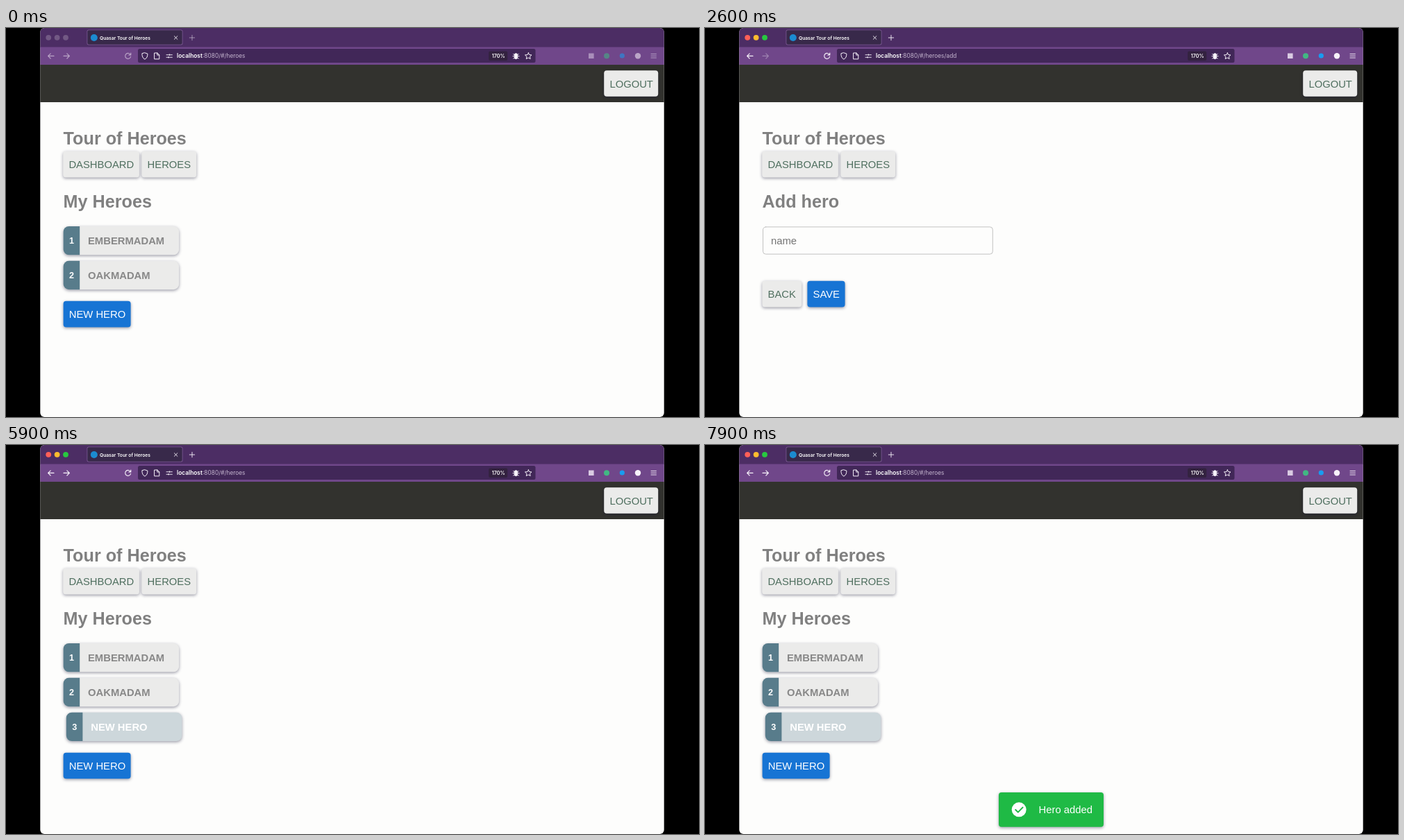
Animation, 998 px wide and 561 px high, one loop 8 s. Source, as an HTML page with a canvas:

```html
<!DOCTYPE html>
<html lang="en">
<head>
<meta charset="utf-8">
<title>Tour of Heroes</title>
<style>
  html, body { margin: 0; width: 100%; height: 100%; overflow: hidden; background: #000; }
  canvas { display: block; width: 998px; height: 561px; }
</style>
</head>
<body>
<canvas id="stage"></canvas>
<script>
const W = 998, H = 561, LOOP = 8000;
const canvas = document.getElementById('stage');
const ctx = canvas.getContext('2d');
const dpr = window.devicePixelRatio || 1;
canvas.width = Math.round(W * dpr);
canvas.height = Math.round(H * dpr);

const SANS = '"Liberation Sans", Arial, sans-serif';
const UI = 'Inter, sans-serif';
const SERIF = '"Noto Serif", serif';
const BLUE = '#1774d4', GREY = '#808080';

// Moments of the session, in ms
const T = {
  activate: 800, hoverNew: 1200, openForm: 2150, focus: 2960,
  hoverSave: 5480, saved: 5720, notify: 5980, leaveItem: 6300, enterItem: 7500
};
const ENTRY = 'New Hero';
const KEYS = [3950, 4090, 4210, 4350, 4530, 4720, 4870, 5000];
const BLINK = 567;

const clamp = v => Math.max(0, Math.min(1, v));

// CSS "ease" timing, solved by bisection
function ease(x) {
  x = clamp(x);
  const bez = (a, b, u) => 3 * a * u * (1 - u) ** 2 + 3 * b * u * u * (1 - u) + u ** 3;
  let lo = 0, hi = 1;
  for (let i = 0; i < 20; i++) {
    const mid = (lo + hi) / 2;
    if (bez(.25, .25, mid) < x) lo = mid; else hi = mid;
  }
  return bez(.1, 1, lo);
}

function box(x, y, w, h, r, fill) {
  ctx.beginPath();
  ctx.roundRect(x, y, w, h, r);
  ctx.fillStyle = fill;
  ctx.fill();
}

function raised(x, y, w, h, r, fill) {
  ctx.save();
  ctx.shadowColor = 'rgba(20,20,50,.42)';
  ctx.shadowBlur = 4 * dpr;
  ctx.shadowOffsetY = 1.5 * dpr;
  box(x, y, w, h, r, fill);
  ctx.restore();
}

function text(s, x, y, font, color) {
  ctx.font = font;
  ctx.fillStyle = color;
  ctx.fillText(s, x, y);
}

function disc(x, y, r, fill) {
  ctx.beginPath();
  ctx.arc(x, y, r, 0, 7);
  ctx.fillStyle = fill;
  ctx.fill();
}

function stroke(d, color, width = 1) {
  ctx.strokeStyle = color;
  ctx.lineWidth = width;
  ctx.lineCap = ctx.lineJoin = 'round';
  ctx.stroke(new Path2D(d));
}

function button(label, x, y, w, fill, color, shade = 0) {
  raised(x, y, w, 37.6, 4, fill);
  if (shade) box(x, y, w, 37.6, 4, `rgba(0,0,0,${shade})`);
  text(label, x + 8.2, y + 24.3, `14.8px ${SANS}`, color);
}
const plain = (label, x, y, w) => button(label, x, y, w, '#ebebea', '#4f6f5f');

function hero(n, name, over) {
  const x = 82.6 + (over ? 4.2 : 0), y = 236 + 49.9 * n, w = 166.6, h = 41.4;
  raised(x, y, w, h, 8, over ? '#cdd7db' : '#ebebea');
  box(x, y, 23.6, h, [8, 0, 0, 8], '#587c8b');
  text(n, x + 8.4, y + 25.2, `bold 12.6px ${SANS}`, '#fff');
  text(name, x + 35.4, y + 26, `bold 14.8px ${SANS}`, over ? '#fff' : '#888');
}

function chrome(active, path, forward) {
  const bright = active ? 1 : .55;
  const ink = '#f7f2fa';
  box(49, 0, 899, 28, 0, '#4c2d64');
  box(49, 27.5, 899, 25.5, 0, '#70478a');

  ['#ff5f57', '#febc2e', '#28c840'].forEach((c, i) =>
    disc(61.2 + 12.4 * i, 13.8, 3.9, active ? c : '#725984'));

  box(116.5, 2.5, 138, 22, 2.5, '#7b5a91');
  box(117.3, 3.3, 136.4, 20.4, 2, '#38294a');
  disc(126.8, 14, 5, '#1b8bd0');
  text('Quasar Tour of Heroes', 135, 16.6, `600 6.7px ${UI}`, '#fff');
  stroke('M242.3 11.7l4.6 4.6M246.9 11.7l-4.6 4.6', ink, .9);

  ctx.globalAlpha = bright;
  stroke('M264.3 14h7.4M268 10.3v7.4', ink, .9);
  stroke('M69 40.4h-8.4M64.2 36.8l-3.6 3.6 3.6 3.6', ink, 1.1);
  ctx.globalAlpha = forward ? bright : .35;
  stroke('M83 40.4h8.4M87.8 36.8l3.6 3.6-3.6 3.6', ink, 1.1);
  ctx.globalAlpha = bright;
  stroke('M179.3 38.6a4 4 0 1 0 .3 2.8M179.8 36v2.9h-2.9', ink, 1.1);
  ctx.globalAlpha = 1;

  box(190, 30, 572.5, 20, 2.5, '#412758');
  stroke('M199.9 35.8l4 1.3c0 4-1 6.4-4 8-3-1.6-4-4-4-8z', ink);
  stroke('M214 36h4l2.8 2.8v6h-6.8zM217.8 36v3h3', ink);
  stroke('M231 38.7h3M237 38.7h2.4M231 42.3h1.8M235.8 42.3h3.6', ink, .9);
  disc(235.5, 38.7, 1.1, ink);
  disc(234.2, 42.3, 1.1, ink);

  const host = 'localhost', font = `600 8.35px ${UI}`;
  text(host, 246, 43.3, font, '#fff');
  const end = 246 + ctx.measureText(host).width;
  text(':8080/#/' + path, end, 43.3, `400 8.35px ${UI}`, '#c6b7d0');

  box(695.2, 33.5, 27, 13.6, 2, '#33223f');
  text('170%', 699.8, 42.9, `600 7.1px ${UI}`, '#fff');
  stroke('M730.6 37.6l1.6 1.2M738.2 37.6l-1.6 1.2M730 40.6h9M730.6 44l1.6-1.2M738.2 44l-1.6-1.2', ink);
  box(731.9, 36.2, 5, 8.8, 2.5, ink);

  ctx.beginPath();
  for (let i = 0; i < 10; i++) {
    const a = -Math.PI / 2 + i * Math.PI / 5, r = i % 2 ? 2.4 : 5;
    ctx.lineTo(752.2 + r * Math.cos(a), 40.5 + r * Math.sin(a));
  }
  ctx.closePath();
  ctx.strokeStyle = ink;
  ctx.lineWidth = 1;
  ctx.stroke();

  ctx.globalAlpha = bright;
  box(839, 36.4, 7.6, 7.6, 0, '#d9cbe2');
  disc(865, 40.2, 4, '#41b883');
  disc(887.3, 40, 3.6, '#189cf0');
  disc(910, 40.2, 4.2, ink);
  stroke('M929 37.4h7.4M929 40.2h7.4M929 43h7.4', ink, .9);
  ctx.globalAlpha = 1;
}

function typed(t) {
  return ENTRY.slice(0, KEYS.filter(k => t >= k).length);
}

function field(t) {
  const f = ease((t - T.focus) / 360);
  const on = t >= T.focus;
  box(82.6, 286, 332.6, 41, 4, '#fdfdfc');
  ctx.beginPath();
  ctx.roundRect(83.5, 286.9, 330.8, 39.2, 4);
  ctx.lineWidth = on ? 1 + f : 1;
  ctx.strokeStyle = on ? '#1976c8' : '#c2c2c2';
  ctx.stroke();
  text('name', 95, 311.8 - 9.8 * f, `${14.8 - 3.7 * f}px ${SANS}`, on ? '#1976c8' : '#747474');
  if (!on) return;

  const value = typed(t);
  text(value, 95, 318, `14px ${SERIF}`, '#222');
  const last = KEYS.filter(k => k <= t).pop() || T.focus;
  if (Math.floor((t - last) / BLINK) % 2 === 0) {
    ctx.fillStyle = '#111';
    ctx.fillRect(95.2 + ctx.measureText(value).width, 304.4, 1.1, 16.6);
  }
}

function form(t) {
  text('Add hero', 82.6, 259.3, `bold 25.2px ${SANS}`, GREY);
  field(t);
  plain('BACK', 82.4, 364.8, 56.8);
  button('SAVE', 147.4, 364.8, 54.2, BLUE, '#fff', .13 * ease((t - T.hoverSave) / 400));
}

function list(t) {
  text('My Heroes', 82.6, 259.3, `bold 25.2px ${SANS}`, GREY);
  hero(1, 'EMBERMADAM');
  hero(2, 'OAKMADAM');
  const added = t >= T.saved;
  if (added) hero(3, 'NEW HERO', t < T.leaveItem || t >= T.enterItem);
  const shade = added ? 0 : .13 * ease((t - T.hoverNew) / 400);
  button('NEW HERO', 82.6, added ? 443.7 : 393.8, 97, BLUE, '#fff', shade);
}

function toast(t) {
  const p = ease((t - T.notify) / 1000);
  if (p <= 0) return;
  ctx.save();
  ctx.globalAlpha = p;
  ctx.translate(0, 52 * (1 - p));
  raised(423, 501, 151, 49.8, 4, '#1fba45');
  disc(452.2, 525.8, 10.5, '#fff');
  stroke('M447.2 526l3.6 3.6 6.8-7', '#1fba45', 2);
  text('Hero added', 480.6, 531, `14.8px ${SANS}`, '#fff');
  ctx.restore();
}

function draw(t) {
  const adding = t >= T.openForm && t < T.saved;
  ctx.setTransform(dpr, 0, 0, dpr, 0, 0);
  ctx.fillStyle = '#000';
  ctx.fillRect(0, 0, W, H);

  ctx.save();
  ctx.beginPath();
  ctx.roundRect(49.3, 0, 898.4, 561, 6);
  ctx.clip();
  box(49, 0, 899, 561, 0, '#fdfdfc');
  chrome(t >= T.activate, adding ? 'heroes/add' : 'heroes', !adding);
  box(49, 53, 899, 54, 0, '#32322e');
  plain('LOGOUT', 861.2, 61.2, 78);

  text('Tour of Heroes', 82.6, 168, `bold 25.2px ${SANS}`, GREY);
  plain('DASHBOARD', 82.2, 177.8, 109.8);
  plain('HEROES', 195.4, 177.8, 78.8);
  if (adding) form(t); else list(t);
  toast(t);
  ctx.restore();
}

const start = performance.now();
function tick() {
  draw((performance.now() - start) % LOOP);
  requestAnimationFrame(tick);
}
tick();
</script>
</body>
</html>
```
